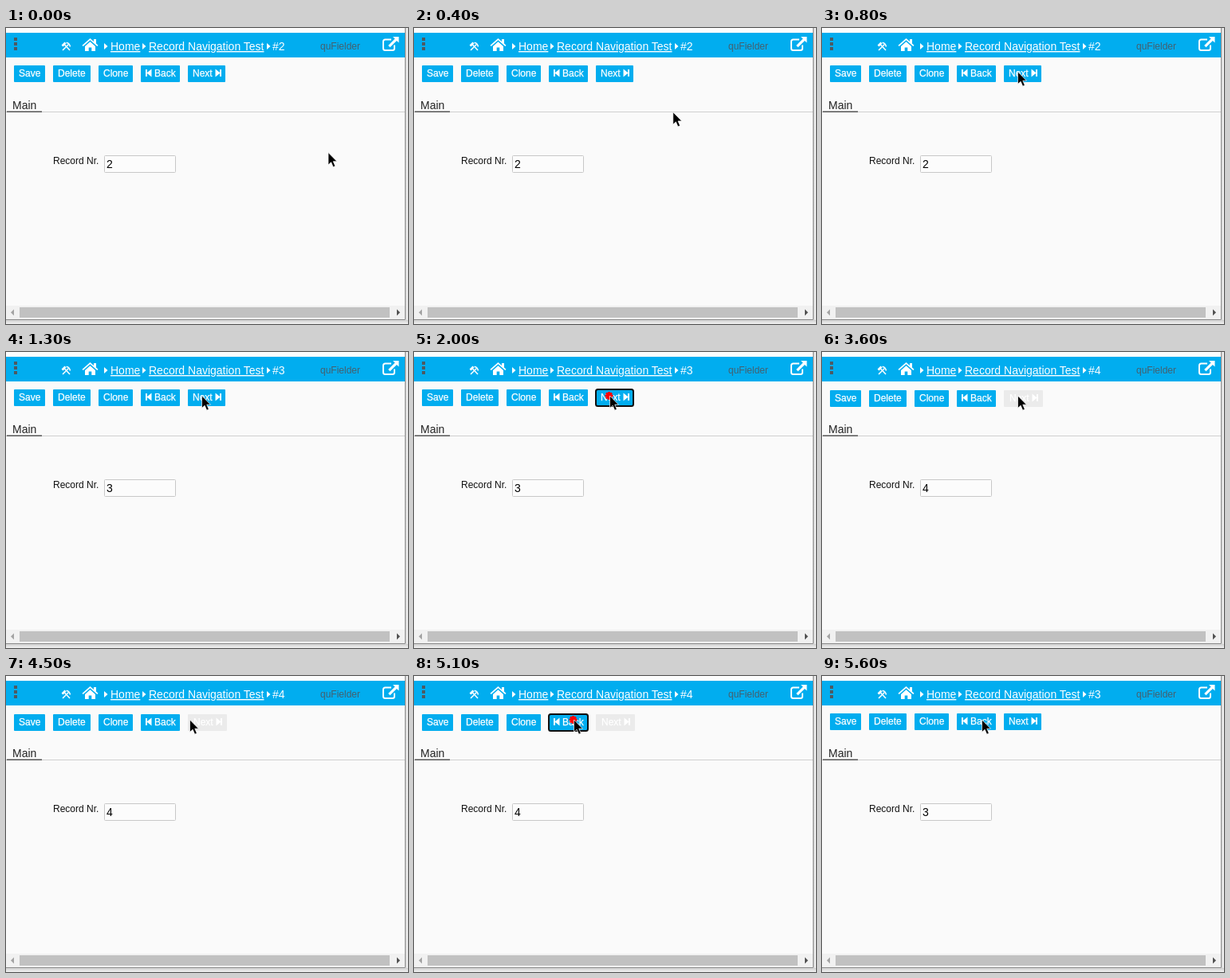
These frames come from a looping animation (504 by 372 pixels, 8.3 s). An HTML page:

```html
<!DOCTYPE html>
<html lang="en">
<head>
<meta charset="utf-8">
<title>Record navigation</title>
<style>
  html, body { margin: 0; width: 100%; height: 100%; overflow: hidden; background: #fafafa; }
  svg { display: block; width: 504px; height: 372px; font-family: "Liberation Sans", Arial, sans-serif; }
  .bar { fill: #01adef; }
  .crumb { font-size: 14px; fill: #fff; }
  .link { text-decoration: underline; }
  .label { font-size: 12px; }
  .btn text { font-size: 12px; fill: #fff; stroke: #fff; stroke-width: .25; }
  .btn path { fill: #fff; }
</style>
</head>
<body>
<svg viewBox="0 0 504 372">
  <defs>
    <linearGradient id="right"><stop stop-color="#d4d4d4"/><stop offset="1" stop-color="#f4f4f4"/></linearGradient>
    <linearGradient id="below" x2="0" y2="1"><stop stop-color="#cfcfcf"/><stop offset="1" stop-color="#f2f2f2"/></linearGradient>
  </defs>

  <!-- window -->
  <rect width="504" height="372" fill="#fafafa"/>
  <rect width="500" height="6" fill="#fdfdfd"/>
  <rect x="501" width="3" height="367" fill="url(#right)"/>
  <rect y="367" width="504" height="5" fill="url(#below)"/>
  <path d="M500.5 0V366.5H0" fill="none" stroke="#8c8c8c"/>

  <!-- header -->
  <rect class="bar" y="6" width="500" height="31"/>
  <path d="M10 12h4v4h-4zM10 18h4v4h-4zM10 24h4v4h-4z" fill="#4d5a62"/>
  <g fill="none" stroke="#fff" stroke-width="1.5">
    <path d="M73 20.5L80 28M78.500 20.500L71 28"/>
    <path d="M70.500 22.500L74.500 18.500" stroke-width="2.600"/>
    <path d="M75.500 18.500Q79.500 18.500 80.500 23.500"/>
  </g>
  <path d="M105.500 13L110 17V14h3v5.500l2.500 2.300-1.200 1.300-8.800-7.800-8.800 7.800-1.200-1.300zM105.500 17.200L112 23v6h-4.700v-4.500h-3.600V29H99v-6z" fill="#fff"/>
  <path d="M123 19l4.500 4-4.500 4zM171 19l4.500 4-4.500 4zM327 19l4.500 4-4.500 4z" fill="#fff"/>
  <text class="crumb link" x="131" y="28">Home</text>
  <text class="crumb link" x="179" y="28">Record Navigation Test</text>
  <text class="crumb" id="crumb" x="334" y="28"></text>
  <text class="label" x="394" y="27" fill="#46606e">quFielder</text>
  <path d="M483 14.500h-7.500a2.500 2.500 0 0 0-2.500 2.500v8.500a2.500 2.500 0 0 0 2.500 2.500h9a2.500 2.500 0 0 0 2.500-2.500V21.500" fill="none" stroke="#fff" stroke-width="2"/>
  <path d="M485 11h7.500v7.500l-2.600-2.600-8.400 8.400-2.300-2.300 8.400-8.400z" fill="#fff"/>

  <g id="buttons"></g>

  <!-- tab and form -->
  <rect y="105" width="500" height="1" fill="#cfcfcf"/>
  <rect x="1" y="104.500" width="44" height="1.500" fill="#555"/>
  <text x="8" y="102" font-size="14" fill="#222">Main</text>
  <text class="label" x="59" y="171" fill="#111">Record Nr.</text>
  <rect x="123.500" y="160.500" width="89" height="21" rx="1" fill="#fcfcfc" stroke="#c8c8c8"/>
  <text id="field" x="126" y="176" font-size="14"></text>

  <!-- scrollbar -->
  <rect y="349" width="500" height="17" fill="#f1f1f1"/>
  <rect x="17" y="351" width="464" height="13" fill="#c1c1c1"/>
  <path d="M10 353.500v8l-4-4z" fill="#a3a3a3"/>
  <path d="M490 353.500v8l4-4z" fill="#505050"/>

  <path id="star" stroke="#f00" stroke-width="2.600" d="M-5 0H5M0-5V5M-3.500-3.500L3.500 3.500M-3.500 3.500L3.500-3.500"/>
  <path id="cursor" d="M0 0V15.500L3.600 12.200 6.200 18.200 8.800 17 6.300 11.200H11Z" stroke="#fff" stroke-width=".7"/>
</svg>
<script>
const LOOP = 8300, STEP = 100;
const $ = id => document.getElementById(id);

// label, left, width, text x
const BUTTONS = [
  ["Save", 10, 39, 16], ["Delete", 59, 47, 65], ["Clone", 116, 43, 122],
  ["Back", 169, 49, 186], ["Next", 228, 47, 234]
];
const ICONS = {
  Back: "M175 52h2v4l5.500-4.500v10l-5.500-4.500v4h-2z",
  Next: "M270 52h-2v4l-5.500-4.500v10l5.500-4.500v4h2z"
};
$("buttons").innerHTML = BUTTONS.map(([name, x, w, tx]) =>
  `<g class="btn" id="${name}">
    <rect class="bar" x="${x}" y="47" width="${w}" height="21" rx="1"/>
    <rect class="ring" x="${x}" y="47" width="${w}" height="21" rx="2.500" fill="none" stroke="#101010" stroke-width="2"/>
    <text x="${tx}" y="61">${name}</text>
    ${ICONS[name] ? `<path d="${ICONS[name]}"/>` : ""}
  </g>`).join("");

// cursor path: time, x, y
const PATH = [[0, 404, 156.5], [800, 245.5, 55], [4400, 245.5, 55], [4700, 200.5, 55]];
// button, press time, star end, focus end
const CLICKS = [
  ["Next", 1000, 1100, 1300], ["Next", 2000, 2200, 2500],
  ["Next", 3400, 3500, 3600], ["Back", 5100, 5300, 5500]
];
const RECORDS = [[0, 2], [1300, 3], [2500, 4], [5500, 3]];

const within = (t, from, to) => t >= from && t < to;

function cursorAt(t) {
  const i = PATH.findIndex(p => p[0] > t);
  if (i < 0) return PATH[PATH.length - 1].slice(1);
  const [t0, x0, y0] = PATH[i - 1], [t1, x1, y1] = PATH[i];
  let u = (t - t0) / (t1 - t0);
  if (i === 1) u = u * u * (3 - 2 * u);
  return [x0 + (x1 - x0) * u, y0 + (y1 - y0) * u];
}

function draw(time) {
  const t = Math.floor((time % LOOP) / STEP) * STEP;
  const [x, y] = cursorAt(t);
  const record = RECORDS.filter(r => r[0] <= t).pop()[1];
  const click = CLICKS.find(c => within(t, c[1], c[3]));
  const off = within(t, 3600, 5500);

  $("crumb").textContent = "#" + record;
  $("field").textContent = record;
  $("cursor").setAttribute("transform", `translate(${x} ${y})`);
  $("star").setAttribute("transform", `translate(${x - 1} ${y})`);
  $("star").style.display = click && t < click[2] ? "" : "none";
  $("buttons").setAttribute("transform", `translate(0 ${off ? 1 : 0})`);

  for (const [name] of BUTTONS)
    $(name).querySelector(".ring").style.display = click && click[0] === name ? "" : "none";

  const face = $("Next").querySelector(".bar");
  face.style.fill = off ? "#ebebeb" : "";
  face.setAttribute("width", off ? 49 : 47);
  for (const part of $("Next").querySelectorAll("text, path"))
    part.setAttribute("transform", `translate(${off ? 1 : 0} 0)`);
}

let start;
function tick(now) {
  start ??= now;
  draw(now - start);
  requestAnimationFrame(tick);
}
draw(0);
requestAnimationFrame(tick);
</script>
</body>
</html>
```
